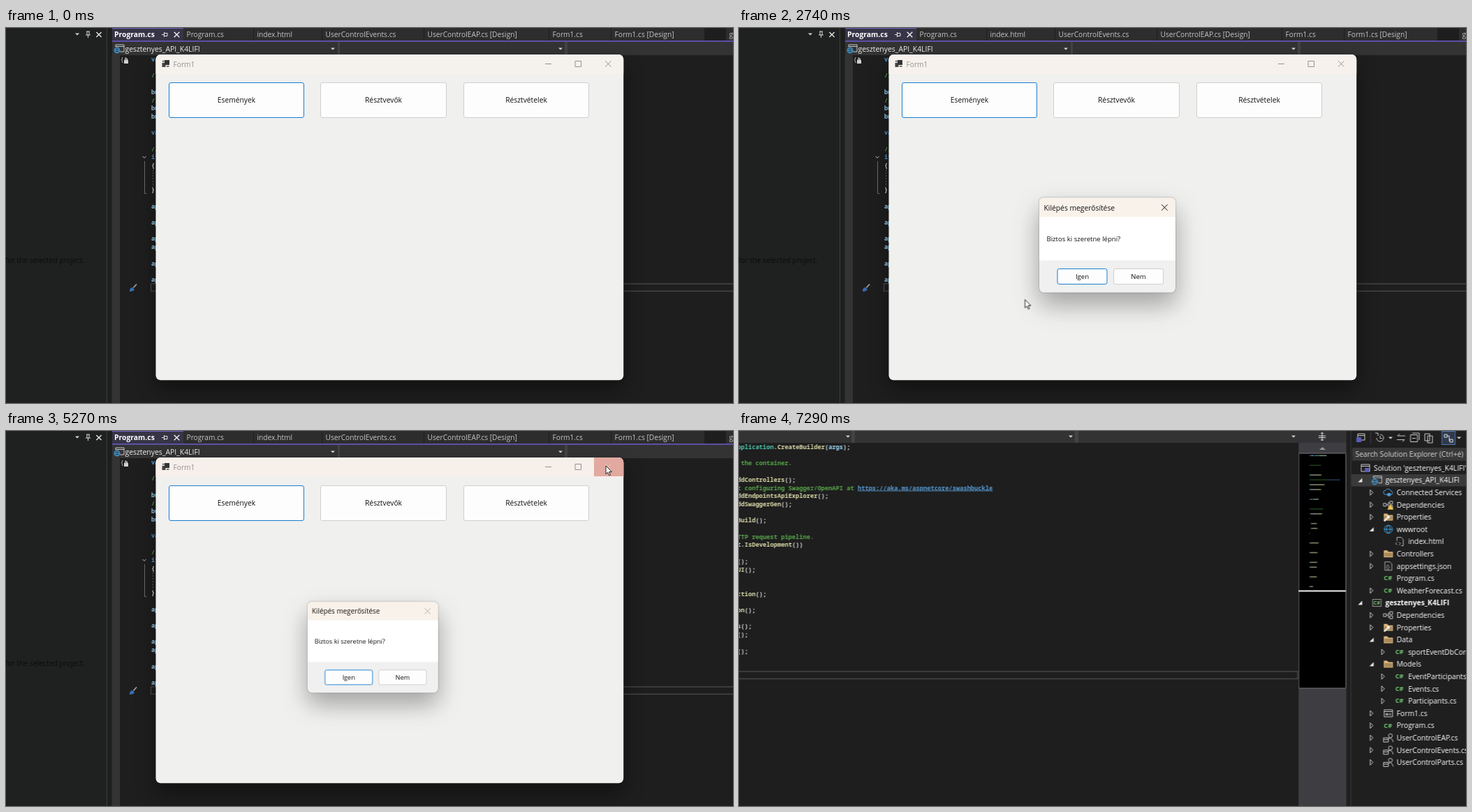
These frames come from a looping animation (1041x538 px, 8420 ms). An HTML page:

```html
<!DOCTYPE html>
<html lang="hu">
<head>
<meta charset="utf-8">
<title>Form1</title>
<style>
html, body { margin: 0; width: 100%; height: 100%; overflow: hidden; background: #1e1e1e; }
svg { display: block; width: 100vw; height: 100vh; }
text { font: 10.2px "Open Sans", "Noto Sans", sans-serif; white-space: pre; }
.code text { font: 600 8.71px "Noto Sans Mono", "DejaVu Sans Mono", monospace; }
.line { fill: none; stroke: currentColor; }
#form { transform-origin: 497px 242px; filter: drop-shadow(0 14px 14px rgba(0,0,0,.4)); }
#dialog { transform-origin: 473px 282px; filter: drop-shadow(0 17px 18px rgba(0,0,0,.26)) drop-shadow(0 0 1px rgba(0,0,0,.35)); }
#dialog .small { font-size: 9.55px; }
#beam { mix-blend-mode: difference; }
</style>
</head>
<body>
<svg viewBox="0 0 1041 538" preserveAspectRatio="none">
  <g id="camera">
    <g id="ide"></g>
    <g id="side" transform="translate(304.5 22)"></g>
  </g>
  <g id="form"></g>
  <g id="dialog"></g>
  <g id="arrow"><path id="arrowInk" d="M0 0V11.8L2.7 9.3 4.6 13.7 6.5 12.9 4.6 8.6H8.4Z" fill="#fff" stroke="#111" stroke-width=".9"/></g>
  <g id="beam"><path id="beamInk" class="line" color="#fff" d="M-3-5.5h2.2L0-5 .8-5.5H3M0-5V5M-3 5.5h2.2L0 5l.8.5H3"/></g>
</svg>
<script>
const LOOP = 8420;
const PROJECT = 'gesztenyes_K4LIFI', API = 'gesztenyes_API_K4LIFI';
const put = (id, html) => document.getElementById(id).innerHTML = html;
const rect = (x, y, w, h, fill, more = '') => `<rect x="${x}" y="${y}" width="${w}" height="${h}" fill="${fill}" ${more}/>`;
const path = (d, color, more = '') => `<path class="line" d="${d}" color="${color}" ${more}/>`;
const fill = (d, c) => `<path d="${d}" fill="${c}"/>`;
const text = (x, y, s, fill, more = '') => `<text x="${x}" y="${y}" fill="${fill}" ${more}>${s}</text>`;
const down = (x, y) => fill(`M${x - 3} ${y - 1.5}h6l-3 3z`, '#d8d8d8');
const cross = (x, y, r) => `M${x - r} ${y - r}l${2 * r} ${2 * r}m0 ${-2 * r}l${-2 * r} ${2 * r}`;
const globe = (x, y, r, c = '#3f9fdf') => path(`M${x - r} ${y}a${r} ${r} 0 1 0 ${2 * r} 0a${r} ${r} 0 1 0 ${-2 * r} 0h${2 * r}M${x} ${y - r}q${-r} ${r} 0 ${2 * r}q${r} ${-r} 0 ${-2 * r}`, c);
const win = (x, y, w, h) => path(`M${x} ${y}h${w}v${h}h${-w}zm0 2.5h${w}`, '#c8c8c8');

// Code listing
const source = `var builder = WebApplication.CreateBuilder(args);

// Add services to the container.

builder.Services.AddControllers();
// Learn more about configuring Swagger/OpenAPI at https://aka.ms/aspnetcore/swashbuckle
builder.Services.AddEndpointsApiExplorer();
builder.Services.AddSwaggerGen();

var app = builder.Build();

// Configure the HTTP request pipeline.
if (app.Environment.IsDevelopment())
{
    app.UseSwagger();
    app.UseSwaggerUI();
}

app.UseHttpsRedirection();

app.UseAuthorization();

app.UseDefaultFiles();
app.UseStaticFiles();

app.MapControllers();

app.Run();`.split('\n');
const rules = [
  [/^https:.*/, '#569cd6'], [/^\/\/.*?(?=https|$)/, '#57a64a'], [/^(var|if)\b/, '#569cd6'],
  [/^WebApplication/, '#4ec9b0'], [/^(builder|app|args)\b/, '#9cdcfe'],
  [/^\w+(?=\()/, '#dcdcaa'], [/^\w+/, '#dcdcdc'], [/^ +/, ''], [/^[^\w ]/, '#dcdcdc']
];
const tokens = [];
source.forEach((s, row) => {
  for (let col = 0; col < s.length;) {
    const rest = s.slice(col);
    const [re, color] = rules.find(r => r[0].test(rest));
    const word = rest.match(re)[0];
    if (color) tokens.push({ row, col, word, color });
    col += word.length;
  }
});
const code = tokens.map(k => text(208 + k.col * 5.225, 48 + k.row * 11.7, k.word, k.color,
  k.word.startsWith('https') ? 'text-decoration="underline"' : '')).join('');
const minimap = tokens.map(k => rect(817 + k.col * .5, 34.5 + k.row * 6.96, k.word.length * .5, 1.6, k.color,
  `opacity="${k.word.length > 25 ? .35 : .6}"`)).join('');

// Editor window
const tabs = [[254, 355, 'Program.cs'], [355, 453, 'index.html'], [453, 599, 'UserControlEvents.cs'],
  [599, 778, 'UserControlEAP.cs [Design]'], [778, 867, 'Form1.cs'], [867, 1001, 'Form1.cs [Design]'], [1031, 1180, API]];
put('ide',
  rect(0, 0, 1400, 600, '#1e1e1e') + rect(0, 0, 145, 600, '#1e2120') +
  rect(144, 0, 1, 600, '#3c3c3f') + rect(151.5, 39, 11.5, 560, '#333') +
  down(102, 9) + path('M115 5h5M116 5v5M119 5v5M114 10h7M117.5 10v4', '#d8d8d8') + path(cross(133, 9.5, 3.6), '#e4e4e4', 'stroke-width="1.4"') +
  text(-1, 337, 'for the selected project.', '#0a0c0b', 'style="font-size:10.3px"') +
  rect(152, 0, 102, 19, '#363446') + rect(152, 0, 102, 1, '#6a5fc0') +
  tabs.map(([a, b, s]) => rect(a, 0, b - a - 1, 18, '#2d2d2d') + text(a + 4.5, 12.5, s, '#c4c4c4')).join('') +
  rect(152, 18, 1028, 1.8, '#6156b4') +
  text(155, 13, 'Program.cs', '#fff', 'style="font-weight:700;font-size:10.4px"') +
  path('M223 9.5h3.5M226.500 6v7M226.500 7.500h4.500v4h-4.500', '#e4e4e4') + path(cross(244.5, 9.5, 3.8), '#f0f0f0', 'stroke-width="1.4"') +
  rect(152, 20, 953, 19, '#333334') +
  '<g id="navA">' + rect(475, 20, 3, 19, '#434346') + rect(800, 20, 4, 19, '#434346') + down(468, 30) + down(794, 30) + '</g>' +
  win(157, 24, 12, 10) + rect(154, 27, 9, 10, '#333334') + globe(159, 32, 4) +
  text(170.5, 33.5, API, '#f0f0f0', 'style="font-size:10.4px"') +
  text(164.5, 49, '{ }', '#d0d0d0', 'style="font-size:9px"') + rect(169, 46, 6, 5, '#d0d0d0') + path('M170.500 46v-2h3v2', '#d0d0d0') +
  path('M195.500 184l2.500 2.500 2.500-2.500', '#c8c8c8') + path('M198.500 191v46.500h3', '#6a6a6a') +
  path('M210.500 203v25', '#666', 'stroke-dasharray="2 2"') +
  path('M187 367.500l-4.500 5', '#a8a8a8', 'stroke-width="1.6"') + fill('M177 378q-.5-5 4-6l3 3q-2 3.500-7 3z', '#3a6cae') +
  rect(207.5, 367, 897, 10.5, 'none', 'stroke="#484848" stroke-width="1.4"') +
  '<g class="code">' + code + '</g>' + rect(207.5, 367, 1.3, 10.5, '#dcdcdc', 'id="caret"'));

// Solution tree
const folder = (x, y) => fill(`M${x - 6.5} ${y - 5}h5l1.500 2h6.500v8h-13z`, '#dcb67a') + rect(x - 5.5, y - 1.5, 11, 5.5, '#a88b5c');
const icons = {
  folder,
  cs: (x, y) => text(x - 6.5, y + 3, 'C#', '#6cc26c', 'style="font-weight:700;font-size:9.3px"'),
  csProj: (x, y) => rect(x - 6, y - 5, 12, 10, 'none', 'stroke="#9a9a9a"') + text(x - 5, y + 2.8, 'C#', '#6cc26c', 'style="font-weight:700;font-size:7.5px"'),
  sln: (x, y) => win(x - 6, y - 5, 12, 10) + rect(x - 1, y, 6, 6, '#5a5fb8'),
  web: (x, y) => win(x - 5, y - 6, 12, 10) + rect(x - 8, y - 3, 10, 10, '#3a3a3a') + globe(x - 3, y + 2, 4.2),
  cloud: (x, y) => path(`M${x - 4} ${y + 3}a3 3 0 0 1 0-6a4 4 0 0 1 7.500 1a2.500 2.500 0 0 1 0 5z`, '#4aa0e0') + `<circle cx="${x + 1}" cy="${y + 3}" r="2.500" fill="#4aa0e0"/>`,
  deps: (x, y) => path(`M${x - 7} ${y - 2}h4v4h-4zM${x + 2} ${y - 5}h4v4h-4zM${x + 2} ${y + 1}h4v4h-4zM${x - 3} ${y}h3v-3h2M${x} ${y}v3h2`, '#c0c0c0'),
  warn: (x, y) => icons.deps(x, y) + fill(`M${x + 3} ${y - 1}l4.500 8h-9z`, '#f2c14e'),
  props: (x, y) => folder(x, y) + path(`M${x - 6} ${y + 6}l5-5`, '#f0f0f0', 'stroke-width="2.2"') + `<circle cx="${x}" cy="${y}" r="2.2" fill="#f0f0f0"/>`,
  globe: (x, y) => globe(x, y, 5.8),
  doc: (x, y) => path(`M${x - 5} ${y - 6}h7l3 3v9h-10z`, '#a8a8a8') + text(x - 3.6, y + 3, '{}', '#d0d0d0', 'style="font-size:7.5px"'),
  html: (x, y) => path(`M${x - 4} ${y - 1}v-5h6l3 3v9h-3M${x - 4} ${y + 1}l-2 2 2 2M${x - 1} ${y + 1}l2 2-2 2`, '#b8b8b8'),
  form: (x, y) => win(x - 6, y - 5, 12, 10) + rect(x - 4, y, 4, 3, '#999') + rect(x + 1, y, 3, 3, '#777'),
  user: (x, y) => `<circle class="line" color="#c8c8c8" cx="${x + 3}" cy="${y - 3}" r="2.800"/>` + path(`M${x} ${y + 2}q3-4 6.500 2v2`, '#c8c8c8') + win(x - 7, y, 7, 6)
};
// [depth, expander, icon, label]
const tree = [
  [0, '', 'sln', `Solution '${PROJECT}'`], [1, 'v', 'web', API], [2, '>', 'cloud', 'Connected Services'],
  [2, '>', 'warn', 'Dependencies'], [2, '>', 'props', 'Properties'], [2, 'v', 'globe', 'wwwroot'], [3, '', 'html', 'index.html'],
  [2, '>', 'folder', 'Controllers'], [2, '>', 'doc', 'appsettings.json'], [2, '', 'cs', 'Program.cs'], [2, '>', 'cs', 'WeatherForecast.cs'],
  [1, 'v', 'csProj', PROJECT], [2, '>', 'deps', 'Dependencies'], [2, '>', 'props', 'Properties'], [2, 'v', 'folder', 'Data'],
  [3, '>', 'cs', 'sportEventDbContext.cs'], [2, 'v', 'folder', 'Models'], [3, '>', 'cs', 'EventParticipants.cs'],
  [3, '>', 'cs', 'Events.cs'], [3, '>', 'cs', 'Participants.cs'], [2, '>', 'form', 'Form1.cs'], [2, '>', 'cs', 'Program.cs'],
  [2, '>', 'user', 'UserControlEAP.cs'], [2, '>', 'user', 'UserControlEvents.cs'], [2, '>', 'user', 'UserControlParts.cs']
];
const rows = tree.map(([depth, open, icon, label], i) => {
  const x = 909 + depth * 16.4, y = 53 + i * 17.6, a = x - 36;
  return (open === 'v' ? fill(`M${a + 3} ${y - 3}v6h-6z`, '#e8e8e8') : open ? path(`M${a - 2} ${y - 4}l4 4-4 4z`, '#c8c8c8') : '') +
    icons[icon](x - 12, y) + text(x, y + 3.7, label, '#fff', `style="font-size:10.3px;${icon === 'csProj' ? 'font-weight:700' : ''}"`);
}).join('');
put('side',
  '<g id="navB">' + rect(-150, -2, 951, 19, '#333334') + [161, 481].map(x => rect(x, -2, 5, 19, '#434346')).join('') +
  [156, 475, 794].map(x => down(x, 8)).join('') + '</g>' +
  rect(801, -2, 69, 560, '#3e3e42') + rect(801, -2, 69, 19, '#333336') +
  path('M830 7h10M830 9.500h10M835 2v12M833 4l2-2 2 2M833 12l2 2 2-2', '#e0e0e0') +
  fill('M831 27h9l-4.500-4z', '#999') +
  rect(801.5, 32, 67.5, 337, '#000', 'stroke="#77777b" rx="1"') + minimap + rect(801, 228.5, 68, 2, '#f0f0f0') +
  rect(870, -42, 7, 600, '#1f1f1f') + rect(876, -42, 1, 600, '#48484b') + rect(877, -42, 500, 600, '#1f1f1f') +
  win(886, 4, 10, 9) + rect(884, 9, 7, 7, '#5a5fb8') + rect(904, 2, 1, 16, '#444') +
  path('M913 10a5 5 0 1 0 5-5M918 7v3.500h3M911 3h4v4', '#c8c8c8') + down(933, 10) +
  path('M954 7h-11l3-3M942 12.500h11l-3 3', '#c8c8c8') + path('M964 3h10v10M961.500 5.500h10v10h-10zM964 10.500h5', '#c8c8c8') +
  path('M982 4h7v10h-7zM986 7h7v10h-7z', '#c8c8c8') +
  rect(1006.5, .5, 19, 19, '#2f3a4c', 'stroke="#5577b0"') + path('M1010 5h4v4h-4zM1018 12h4v4h-4zM1014 7h3v7h1', '#e0e0e0') + down(1031, 10) +
  rect(878, 24, 300, 18.5, '#383838') + text(882.5, 37, 'Search Solution Explorer (Ctrl+é)', '#d8d8d8', 'style="font-size:10.3px"') +
  rect(877, 62, 300, 17.5, '#3a3a3a') + rows);

// Application window and dialog
const button = (x, y, w, h, label, id, stroke, size) =>
  rect(x + .5, y + .5, w - 1, h - 1, '#fdfdfd', `rx="2.5" stroke="${stroke}" id="${id}"`) +
  text(x + w / 2, y + h / 2 + 3.6, label, '#111', `text-anchor="middle" style="font-size:${size}px"`);
put('form',
  rect(214.5, 38, 669.7, 467.3, '#f0f0ef', 'rx="7"') +
  '<path id="titleBar" d="M214.500 66V45a7 7 0 0 1 7-7h655.700a7 7 0 0 1 7 7v21z"/>' +
  '<path id="closeBg" d="M842 65V38h35.200a7 7 0 0 1 7 7v20z"/>' +
  rect(223.5, 50, 5, 6, '#444') + rect(227, 46, 7, 7, '#333') + rect(224, 46.5, 2.5, 2.5, '#777') + rect(230, 54, 3.5, 2, '#777') +
  '<g id="titleInk">' + text(239.5, 55.5, 'Form1', 'currentColor') +
  path('M772 51.500h9M815 47.500h8.500v8h-8.500z', 'inherit') + '</g>' +
  `<path id="closeInk" class="line" d="${cross(862.3, 51.5, 4.2)}"/>` +
  button(233, 78, 194, 51, 'Események', 'events', '#1a7dd0', 10.3) +
  button(450, 78, 181, 51, 'Résztvevők', 'people', '#cfcfcf', 10.3) +
  button(655, 78, 180, 51, 'Résztvételek', 'entries', '#cfcfcf', 10.3));
put('dialog',
  rect(430, 243.5, 195, 136, '#f0f0f0', 'rx="6.5"') +
  fill('M430 272V250a6.500 6.500 0 0 1 6.500-6.500h182a6.500 6.500 0 0 1 6.500 6.500v22z', '#f9f2ea') + rect(430, 271, 195, 62.5, '#fff') +
  text(436.5, 261.5, 'Kilépés megerősítése', '#111', 'style="font-size:10.3px"') +
  `<path id="dialogX" class="line" d="${cross(609.3, 257.5, 4.3)}"/>` +
  text(440.5, 306.3, 'Biztos ki szeretne lépni?', '#111', 'class="small"') +
  button(455.5, 345, 72, 23, 'Igen', 'yes', '#1a7dd0', 9.55) +
  button(536, 345, 72, 23, 'Nem', 'no', '#cfcfcf', 9.55));

// Keyframes, written in milliseconds
let css = '';
function play(id, frames, ease = 'linear') {
  const all = [...frames, [LOOP, frames[frames.length - 1][1]]];
  const body = all.map(([ms, s]) => `${(ms / LOOP * 100).toFixed(3)}%{${s}}`).join('');
  css += `@keyframes ${id}{${body}}#${id}{animation:${id} ${LOOP}ms ${ease} infinite}`;
}
const step = (id, prop, frames) => play(id, frames.map(([ms, v]) => [ms, `${prop}:${v}`]), 'step-end');
const move = (id, points) => play(id, points.map(([ms, x, y]) => [ms, `transform:translate(${x}px,${y}px)`]));
const zoom = (id, frames) => play(id, frames.map(([ms, s, o]) => [ms, `transform:scale(${s});opacity:${o}`]));

move('camera', [[0, 0, 0], [6950, 0, 0], [7030, -60, -4], [7210, -260, -19], [7290, -304.5, -22]]);
move('arrow', [[0, 655, 392], [330, 655, 392], [520, 705, 320], [740, 800, 185], [950, 880, 72], [1080, 862, 54], [1160, 850, 51],
  [2120, 850, 51], [2250, 780, 110], [2440, 560, 290], [2600, 375, 392], [2680, 355, 397], [2820, 480, 380], [2950, 575, 358], [3020, 586, 356],
  [3620, 586, 356], [3780, 640, 270], [4000, 760, 110], [4170, 814, 55], [4240, 844, 50], [4580, 858, 49], [4909, 858, 49], [4910, 859, 50],
  [5440, 859, 50], [5560, 780, 115], [5760, 590, 285], [5930, 498, 347], [6000, 490, 350], [6490, 492, 352]]);
step('arrowInk', 'opacity', [[0, 0], [330, 1], [6700, 0]]);
move('beam', [[0, 492.5, 357.5], [6760, 492.5, 357.5], [6840, 564.5, 387.5], [6920, 740, 418], [7000, 1060, 430]]);
step('beamInk', 'opacity', [[0, 0], [6700, 1], [7000, 0]]);

zoom('form', [[0, 1, 1], [6765, 1, 1], [6840, .966, .46], [6915, .93, 0]]);
zoom('dialog', [[0, .92, 0], [1740, .92, 0], [1780, .95, 1], [1850, 1, 1], [3420, 1, 1], [3510, .958, .5], [3590, .92, 0],
  [5210, .92, 0], [5250, .945, 1], [5270, .958, 1], [5340, 1, 1], [6740, 1, 1], [6760, .992, 1], [6840, .952, .33], [6890, .92, 0]]);

step('titleBar', 'fill', [[0, '#f5f1ec'], [1230, '#f3f1f1'], [1950, '#f6f1ec'], [3420, '#f4f2ef'], [5210, '#f7efe9'], [6690, '#faf2ea']]);
step('titleInk', 'color', [[0, '#929292'], [1230, '#111'], [1740, '#929292'], [3420, '#111'], [5210, '#929292'], [6690, '#111']]);
step('closeBg', 'fill', [[0, 'transparent'], [1090, '#c42b1c'], [1740, '#e2a9a0'], [2140, 'transparent'],
  [4240, '#c42b1c'], [5210, '#e2a9a0'], [5470, 'transparent']]);
step('closeInk', 'color', [[0, '#929292'], [1090, '#fff'], [1740, '#edc4bd'], [2140, '#929292'], [3420, '#111'],
  [4240, '#fff'], [5210, '#edc4bd'], [5470, '#929292'], [6690, '#111']]);
step('dialogX', 'color', [[0, '#b0aaa4'], [1930, '#111'], [5210, '#b0aaa4'], [5400, '#111']]);
play('yes', [[0, 'fill:#fdfdfd;stroke:#1a7dd0'], [3349, 'fill:#fdfdfd;stroke:#1a7dd0'], [3350, 'fill:#fdfdfd;stroke:#cfcfcf'],
  [5200, 'fill:#fdfdfd;stroke:#cfcfcf'], [5201, 'fill:#fdfdfd;stroke:#1a7dd0'], [5930, 'fill:#fdfdfd;stroke:#1a7dd0'], [6130, 'fill:#d9eaf8;stroke:#1a7dd0']]);
play('no', [[0, 'fill:#fdfdfd;stroke:#cfcfcf'], [2880, 'fill:#fdfdfd;stroke:#cfcfcf'], [3020, 'fill:#e0eef9;stroke:#1a7dd0'],
  [3350, 'fill:#cce4f7;stroke:#1a7dd0'], [5200, 'fill:#cce4f7;stroke:#1a7dd0'], [5201, 'fill:#fdfdfd;stroke:#cfcfcf']]);
step('caret', 'opacity', [[0, 0], [6690, 1]]);
step('navA', 'opacity', [[0, 1], [6950, 0]]);
step('navB', 'opacity', [[0, 0], [6950, 1]]);
document.head.appendChild(document.createElement('style')).textContent = css;
</script>
</body>
</html>
```
